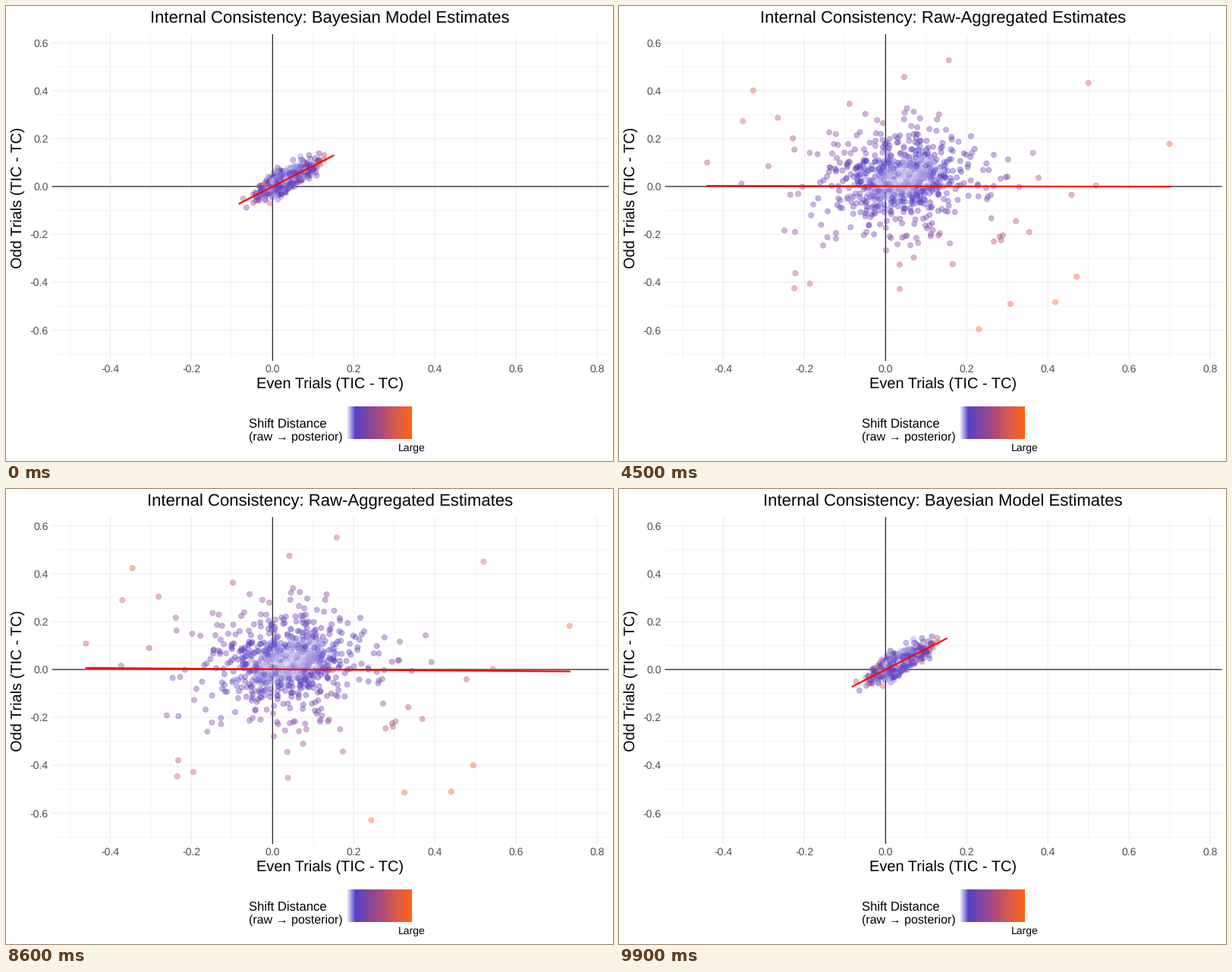
Write a matplotlib script that moves like this. It is 800 px wide and 600 px high and loops after 10 s.

```python
import numpy as np
import matplotlib.pyplot as plt
from matplotlib.animation import FuncAnimation
from matplotlib.colors import LinearSegmentedColormap

W, H = 800, 600
PT = 0.72                      # points per pixel at 100 dpi
X0, Y0 = 351.3, 238.0          # pixel position of the data origin
SX, SY = 534.6, 315.75         # pixels per data unit
LEFT, RIGHT, TOP, BOTTOM = 60.5, 794.5, 37, 468
FRAMES, STEPS = 100, 17
LEAVE, RETURN = 33, 82         # last still frame before each move
SLOPE = 0.514                  # trend of the model estimates, in pixels

plt.rcParams["font.family"] = "Liberation Sans"
plt.rcParams["text.hinting"] = "none"
TITLES = ("Internal Consistency: Bayesian Model Estimates",
          "Internal Consistency: Raw-Aggregated Estimates")

# The farthest raw estimates, in pixels
EXTREMES = np.array([
    (437, 56), (641, 90), (761, 179), (655, 238), (618, 253), (629, 372),
    (599, 408), (535, 408), (489, 448), (220, 386), (94, 201), (143, 141),
    (156, 97), (371, 82)])


def make_points(count=880):
    """Return model positions, raw positions and relative shift distances."""
    rng = np.random.default_rng(5)
    origin, flip = np.array([X0, Y0]), np.array([1, -1])
    center = np.array([18, 18 * SLOPE])

    # Shared signal plus noise of uneven strength: dense core, loose halo
    signal = rng.normal(0, 17, (count, 1)) * (1, SLOPE)
    spread = np.exp(rng.normal(0, 0.6, (count, 1)))
    cloud = center + signal + rng.normal(0, 1, (count, 2)) * spread * (36, 26)
    cloud = cloud[np.hypot(*(cloud / (235, 165)).T) < 1]
    raw = np.vstack([cloud, (EXTREMES - origin) * flip])

    # The model pulls every estimate towards one tilted line
    lean = (raw - center) @ (0.25, 0.35)
    x = center[0] + 48 * np.tanh(lean / 65) + rng.normal(0, 10, len(raw))
    y = SLOPE * x + rng.normal(0, 6.5, len(raw))
    model = np.column_stack([x, y])

    dist = np.hypot(*((raw - model) / (SX, SY)).T)
    order = rng.permutation(len(raw))
    return (origin + flip * model[order], origin + flip * raw[order],
            dist[order] / dist.max())


def ease(t):
    return 4 * t ** 3 if t < 0.5 else 1 - 4 * (1 - t) ** 3


def progress(i):
    """0 at the model estimates, 1 at the raw estimates."""
    if i <= RETURN:
        return ease(min(max(i - LEAVE, 0), STEPS) / STEPS)
    return 1 - ease((i - RETURN) / STEPS)


def label(x, y, s, size, color="black", ha="center", **kw):
    return ax.text(x, y, s, fontsize=size * PT, color=color, ha=ha,
                   va="baseline", **kw)


def rule(xs, ys, color, width, z):
    return ax.plot(xs, ys, color=color, lw=width * PT, zorder=z,
                   solid_capstyle="butt", snap=False)[0]


fig = plt.figure(figsize=(W / 100, H / 100), dpi=100, facecolor="white")
ax = fig.add_axes([0, 0, 1, 1])
ax.axis("off")

shift_map = LinearSegmentedColormap.from_list("shift", [
    (0.0, (0.98, 0.98, 1.0)), (0.13, (0.34, 0.25, 0.78)),
    (0.5, (0.65, 0.29, 0.51)), (0.8, (0.88, 0.36, 0.27)),
    (1.0, (1.0, 0.39, 0.07))], N=512)

# Grid and zero lines
for n in range(-7, 9):
    x, y = X0 + n / 10 * SX, Y0 - n / 10 * SY
    major = n % 2 == 0
    color, width = ("#ebebeb", 1.07) if major else ("#ebebeb", 0.53)
    if LEFT < x < RIGHT:
        rule([x, x], [TOP, BOTTOM], color, width, 1)
        if major:
            label(x, 483, f"{n / 10:.1f}", 14, "#4d4d4d")
    if TOP < y < BOTTOM:
        rule([LEFT, RIGHT], [y, y], color, width, 1)
        if major:
            label(55.5, y + 5, f"{n / 10:.1f}", 14, "#4d4d4d", "right")
rule([LEFT, RIGHT], [Y0, Y0], "black", 1.07, 2)
rule([X0, X0], [TOP, BOTTOM], "black", 1.07, 2)

# Titles and legend
title = label(427.2, 22, TITLES[0], 22.1)
label(427.5, 504, "Even Trials (TIC - TC)", 20)
label(21, 252.5, "Odd Trials (TIC - TC)", 20, rotation=90,
      rotation_mode="anchor")
label(319.5, 556, "Shift Distance", 16.6, ha="left")
label(319.5, 573, "(raw \u2192 posterior)", 16, ha="left")
label(535, 587, "Large", 14)
ax.imshow(np.linspace(0, 1, 300)[None, :], cmap=shift_map, aspect="auto",
          extent=(449, 535, 571, 528), zorder=2)

model, raw, shift = make_points()
tint = shift_map(shift)
tint[:, 3] = 0.4
dots = ax.scatter(model[:, 0], model[:, 1], s=(7.1 * PT) ** 2, facecolors=tint,
                  edgecolors=tint, linewidths=0.75 * PT, zorder=3)
fit_model = np.array([(306.6, 261), (432.5, 196.7)])
fit_raw = np.array([(93.5, 234.5), (761, 243)])
fit = rule(*fit_model.T, "red", 2.13, 4)

ax.set_xlim(0, W)
ax.set_ylim(H, 0)


def draw(i):
    p = progress(i)
    dots.set_offsets(model + p * (raw - model))
    fit.set_data(*(fit_model + p * (fit_raw - fit_model)).T)
    title.set_text(TITLES[p > 0.5])
    return dots, fit, title


anim = FuncAnimation(fig, draw, frames=FRAMES, interval=100, repeat=True,
                     repeat_delay=0, init_func=lambda: draw(0))
plt.show()
```
